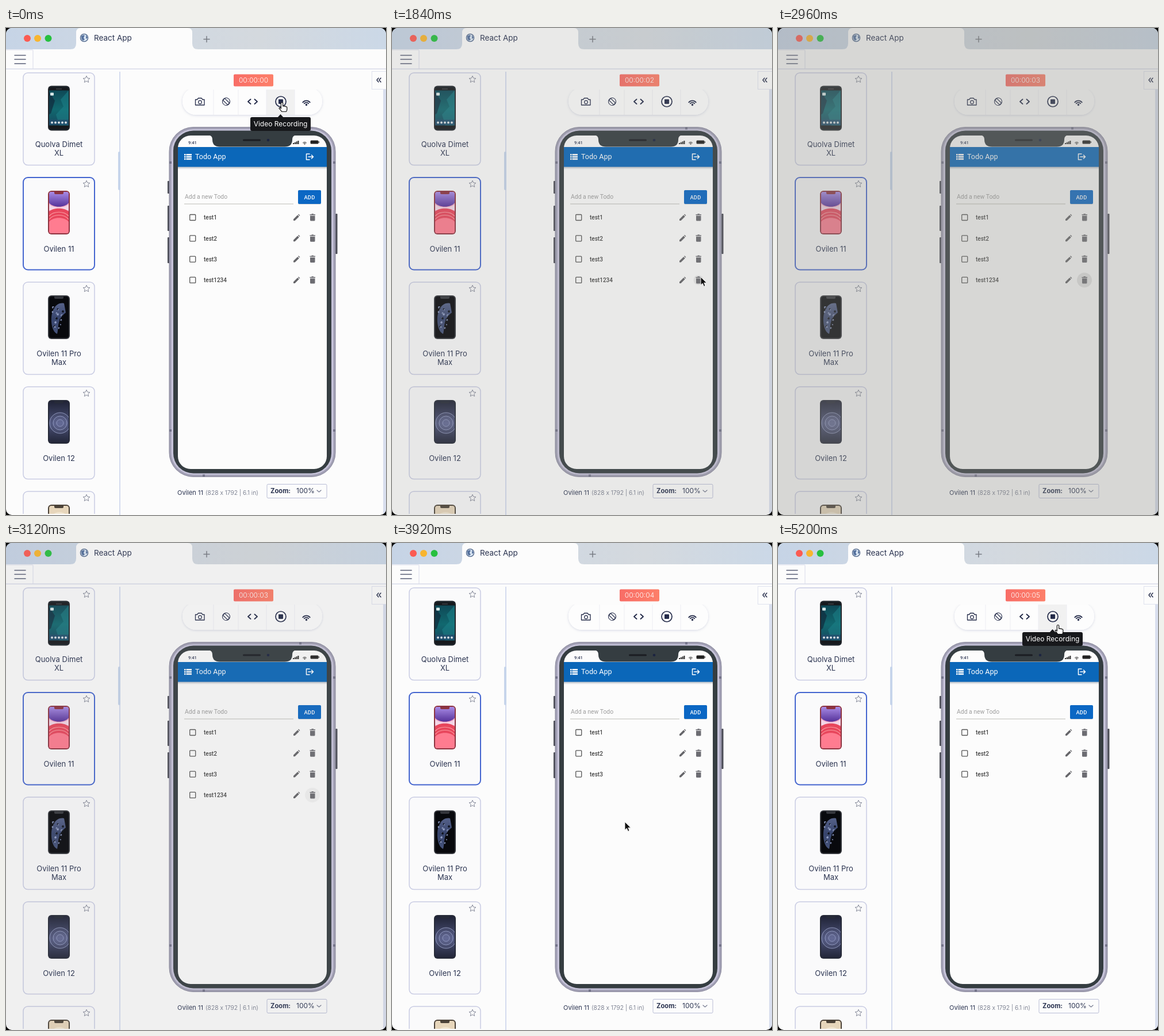
Animation, 661 px wide and 847 px high, one loop 5.24 s. Source, as an HTML page:

```html
<!DOCTYPE html>
<html lang="en">
<head>
<meta charset="utf-8">
<title>Device preview</title>
<style>
  html, body { margin: 0; width: 100%; height: 100%; overflow: hidden; background: #000; }
  svg { display: block; width: 661px; height: 847px; }
  text { font-family: Inter, "Open Sans", sans-serif; fill: #2a3350; white-space: pre; }
  .app text { font-family: Roboto, "Liberation Sans", sans-serif; }
  .mid { text-anchor: middle; }
  .line { fill: none; stroke: #252c4a; stroke-width: 1.5; stroke-linecap: round; stroke-linejoin: round; }
</style>
</head>
<body>
<svg id="stage" viewBox="0 0 661 847" xmlns="http://www.w3.org/2000/svg"></svg>
<script>
const LOOP = 5240;
const ROWS = ["test1", "test2", "test3", "test1234"];
const CARDS = [["Quolva Dimet", "XL"], ["Ovilen 11"], ["Ovilen 11 Pro", "Max"], ["Ovilen 12"], []];

const rect = (x, y, w, h, fill, r = 0, more = "") =>
  `<rect x="${x}" y="${y}" width="${w}" height="${h}" rx="${r}" fill="${fill}" ${more}/>`;
const circle = (x, y, r, fill, more = "") => `<circle cx="${x}" cy="${y}" r="${r}" fill="${fill}" ${more}/>`;
const path = (d, fill, more = "") => `<path d="${d}" fill="${fill}" ${more}/>`;
const line = (d, more = "") => `<path class="line" d="${d}" ${more}/>`;
const text = (x, y, size, str, more = "") => `<text x="${x}" y="${y}" font-size="${size}" ${more}>${str}</text>`;
const at = (x, y, body, more = "") => `<g transform="translate(${x} ${y})" ${more}>${body}</g>`;
const gradient = (id, colors, vertical) =>
  `<linearGradient id="${id}" x2="${vertical ? 0 : 1}" y2="${vertical ? 1 : 0}">` +
  colors.map((c, i) => `<stop offset="${i / (colors.length - 1)}" stop-color="${c}"/>`).join("") + `</linearGradient>`;

function star(x, y) {
  const points = Array.from({ length: 10 }, (_, i) => {
    const r = i % 2 ? 2.9 : 6.2, a = i * Math.PI / 5;
    return `${x + r * Math.sin(a)},${y - r * Math.cos(a)}`;
  });
  return `<polygon points="${points.join(" ")}" fill="none" stroke="#858999" stroke-linejoin="round"/>`;
}

function wifi(x, y, s, color) {
  const arc = r => `M${-r * .77} ${-r * .64}A${r} ${r} 0 0 1 ${r * .77} ${-r * .64}`;
  return at(x, y, `<g transform="scale(${s})">` + circle(0, -1, 2, color) +
    path(arc(5.4) + arc(9), "none", `stroke="${color}" stroke-width="2" stroke-linecap="round"`) + `</g>`);
}

// Thumbnail wallpapers, drawn in a 34 x 74 box
const wallpapers = [
  rect(0, 0, 34, 78, "url(#sea)") + path("M34 6L20 22 25 34 12 48 18 68H34Z", "#1d8289", 'opacity=".55"') +
    path("M0 8L10 24 3 46 0 48Z", "#102a3c", 'opacity=".7"') + rect(2, 10, 6, 5, "#d9e8e8", 1) +
    rect(0, 57, 34, 9, "#244c6c", 0, 'opacity=".8"') +
    [5, 11, 17, 23, 29].map(x => circle(x, 62, 1.9, x % 3 ? "#d8e0e4" : "#5aa0d8")).join("") +
    rect(0, 0, 34, 6, "#17191d") + rect(0, 67, 34, 11, "#17191d"),
  rect(0, 0, 34, 78, "#f0a6c4") + path("M0 0H34V19C28 28 6 28 0 19Z", "url(#violet)") +
    path("M0 21C6 29 28 29 34 21V32H0Z", "#f3d6e6") + path("M0 34C8 27 26 27 34 34V78H0Z", "#e8465c") +
    path("M0 42C8 33 26 33 34 42M0 48C8 38 26 38 34 48", "none", 'stroke="#fa9aa0" stroke-width="1.2"') +
    path("M0 52C7 43 27 43 34 52V78H0Z", "#ff7c90"),
  rect(0, 0, 34, 78, "#08090d") + path("M26 12C12 9 3 24 4 44 5 56 9 63 14 65 17 54 13 40 29 28Z", "url(#nebula)") +
    Array.from({ length: 26 }, (_, i) =>
      circle(6 + i * 7 % 19, 18 + i * 11 % 40, .9 + i % 3 * .5, i % 2 ? "#8f9cc4" : "#10141f")).join(""),
  rect(0, 0, 34, 78, "url(#night)") +
    [6, 12, 18].map(r => circle(19, 38, r, "#8790bd", `fill-opacity=".16" stroke="#a3abd0" stroke-width=".8"`)).join(""),
  rect(0, 0, 34, 78, "#e7d6bb") + circle(18, 28, 17, "#f2e6d0"),
];

function card(lines, i) {
  const y = 78 + i * 182, phoneTop = y + (i ? 23 : 22.5), chosen = i === 1;
  const frame = ["#23262b", "#8c3340", "#34363c", "#262a38", "#4b4238"][i];
  const notch = i ? path("M9 -1H25V2Q25 4 23 4H11Q9 4 9 2Z", frame) : rect(12, 3, 10, 1, "#50545a");
  return rect(30, y, 124, 160.5, "#fafafb", 8, `stroke="${chosen ? "#4465cf" : "#c9cce3"}" stroke-width="${chosen ? 2 : 1.5}"`) +
    star(140, y + 11.5) + rect(73, phoneTop, 38, i ? 76 : 78, frame, 6) +
    at(75, phoneTop + 2, `<g clip-path="url(#thumb${i ? "" : "Tall"})">${wallpapers[i]}${notch}</g>`) +
    lines.map((s, n) => text(92, y + 129 + n * 14.5, 13, s, 'class="mid"')).join("");
}

const chrome = () =>
  rect(0, 0, 661, 847, "#fcfcfc") + rect(0, 0, 661, 37, "url(#strip)") +
  path("M112 37Q122 37 122 27V8Q122 0 130 0H316Q324 0 324 8V27Q324 37 334 37Z", "#fcfcfc") +
  circle(37, 18, 6, "#fb5b52") + circle(55, 18, 6, "#f8b52f") + circle(73.5, 18, 6, "#27c03f") +
  circle(136, 17, 6.6, "#dce8f5", 'stroke="#4d6387" stroke-width="1.3"') +
  path("M131 14Q135 11 137 13L135 17 137 20 134 22Q130 19 131 14ZM139 12L142 17 139 19Z", "#56729e") +
  text(153, 22, 13.5, "React App") +
  line("M344 19.5H354M349 14.5V24.5", 'style="stroke:#777b83"') +
  rect(0, 70.5, 661, 1.5, "#d8dbea") + rect(-1, 38, 48, 33, "#fcfcfc", 1, 'stroke="#d8dbea"') +
  line("M15 47.5H34M15 54.5H34M15 62H34", 'style="stroke:#575d75"') +
  rect(197, 76, 2, 771, "#d5dcef") + rect(195, 215, 4, 67, "#c6d5eb", 2) +
  rect(656, 107, 5, 740, "#d9dfee") + rect(636.5, 75.5, 26, 31, "#fcfcfc", 0, 'stroke="#dfe2ee"') +
  line("M648 87L645 90.5 648 94M652 87L649 90.5 652 94");

const toolbar = () =>
  rect(396, 80.5, 69, 21, "url(#coral)", 2) + text(430.5, 95, 12, "00:00:00", 'id="timer" class="mid" font-weight="300" style="fill:#fff"') +
  `<g clip-path="url(#below)">` + rect(307, 104, 243, 47, "#fff", 23, 'filter="url(#soft)"') + rect(307, 104, 243, 47, "#fdfdfd", 23) + `</g>` +
  rect(453, 107, 49, 44, "#f1f1f1", 0, 'id="recordHover"') +
  [361, 404, 453, 502].map(x => rect(x - .5, 107, 1, 44, "#eeeef4")).join("") +
  line("M329.5 124.5H332.5L334.5 122H340L342 124.5H345V134H329.5Z", 'style="stroke-width:1.3"') +
  circle(337.5, 129, 2.8, "none", 'stroke="#252c4a" stroke-width="1.2"') +
  at(383, 128, line("M-2.2 -5.8H2.2V5.8H-2.2Z", 'transform="rotate(-45)" style="stroke-width:1.2"') +
    line("M-5.6 -3.3A6.5 6.5 0 0 1 5.6 3.3M5.6 3.3A6.5 6.5 0 0 1 -5.6 -3.3", 'style="stroke-width:1.1"')) +
  line("M425.5 124L421 128 425.5 132M432.5 124L437 128 432.5 132", 'style="stroke-width:1.9"') +
  circle(478, 128, 9, "none", 'stroke="#252c4a" stroke-width="1.7"') + rect(474, 124, 8, 8, "#252c4a", 1) +
  wifi(522.5, 134.5, .9, "#252c4a");

const todoRow = (name, i) => at(0, 329.5 + i * 36.3,
  rect(319.7, -5, 10, 10, "none", 1, 'stroke="#555" stroke-width="1.3"') +
  text(344, 3.7, 10, name, 'font-weight="500" style="fill:#444"') +
  circle(505.5, 0, 11, "#000", `id="edit${i}" opacity="0"`) +
  circle(533, 0, 13, "#000", `id="bin${i}" opacity="0"`) +
  path("M500 5.5V3L507.2 -4.2 509.8 -1.6 502.6 5.5ZM508 -5L509 -6 511.4 -3.5 510.5 -2.5Z", "#66666a") +
  path("M528.5 -5.5H531L532 -6.5H534.5L535.5 -5.5H538V-4H528.5ZM529 -3H537.5V4.5Q537.5 6 536 6H530.5Q529 6 529 4.5Z", "#6c6c72"),
  `id="row${i}"`);

const phone = () =>
  [[281, 266, 22], [281, 309, 44], [281, 364, 45], [573, 323, 70]].map(([x, y, h]) => rect(x, y, 3.5, h, "#4b4c56", 1)).join("") +
  rect(284, 172.5, 289, 608, "#a19fb4", 42, 'stroke="#8a899c"') +
  rect(287.5, 176, 282, 601, "#c6c3d9", 38) + rect(291, 178.5, 275, 596, "#353d41", 35) +
  [[284, 232], [569, 232], [284, 698], [569, 698]].map(([x, y]) => rect(x, y, 4, 4, "#74748a")).join("") +
  rect(510, 172.5, 4, 4, "#74748a") + rect(342, 776.5, 4, 4, "#74748a") +
  rect(299, 187, 259, 580, "#fcfcfc", 22) +
  path("M352 186Q359 187 359 194Q359 206.5 372 206.5H485Q498 206.5 498 194Q498 187 505 186Z", "#353d41") +
  rect(412, 193.5, 31, 3, "#1b1d22", 1.5) + circle(456, 195, 2.3, "#1c2440") +
  `<g class="app">` + text(317, 202, 7.5, "9:41", 'font-weight="500"') +
  [0, 1, 2, 3].map(i => rect(499 + i * 2.8, 200 - i * 1.3, 2, 2 + i * 1.3, "#222")).join("") +
  wifi(519.5, 202.3, .45, "#222") + rect(529.5, 195.5, 14, 6, "#222", 1.5) + rect(544, 197.3, 1, 2.4, "#222") +
  rect(299, 241, 259, 5, "url(#shade)") + rect(299, 207, 259, 34.5, "#0b67b9") +
  [219, 222.8, 226.6].map(y => rect(310, y, 2.5, 2.6, "#fff") + rect(313.5, y, 9.5, 2.6, "#fff")).join("") +
  text(329, 228.3, 12.5, "Todo App", 'style="fill:#fff"') +
  line("M528 219H522.5V229H528M526 224H534M531.5 221L534.5 224 531.5 227", 'style="stroke:#fff"') +
  text(311, 297, 10.4, "Add a new Todo", 'style="fill:#9d9d9d"') + rect(310, 305.5, 190, 1, "#bdbdb8") +
  rect(508, 282.5, 40, 24.5, "#555", 2, 'opacity=".2"') + rect(508, 282, 40, 24, "#0b67c4", 2) +
  text(528, 297.6, 9.3, "ADD", 'class="mid" font-weight="500" letter-spacing=".3" style="fill:#fff"') +
  ROWS.map(todoRow).join("") + `</g>` +
  text(298, 812, 11, "Ovilen 11") +
  text(347, 812, 10.3, "(828 x 1792 | 6.1 in)", 'font-weight="300" style="fill:#5f6579"') +
  rect(454, 793.5, 104, 24, "#fcfcfc", 2, 'stroke="#b9bdd6"') +
  text(460, 809.3, 11.2, "Zoom:", 'font-weight="700"') + text(505, 809.3, 12, "100%") +
  line("M541 804L544.5 807 548 804", 'style="stroke:#777c91;stroke-width:1.2"');

const stage = document.getElementById("stage");
stage.innerHTML = `<defs>
  ${gradient("strip", ["#c6d4e6", "#cfd8e3", "#d4d9de", "#cbd8e7"])}
  ${gradient("coral", ["#f86d66", "#fd7f69"])}
  ${gradient("shade", ["#b4bac2", "#fcfcfc"], true)}
  ${gradient("sea", ["#0e4352", "#11686f", "#183d58"], true)}
  ${gradient("violet", ["#a98be6", "#553299"], true)}
  ${gradient("nebula", ["#56628a", "#37446c", "#46547c"], true)}
  ${gradient("night", ["#202336", "#4a5076", "#1c1f2e"], true)}
  <clipPath id="window">${rect(0, 0, 661, 847, "#fff", 10)}</clipPath>
  <clipPath id="side">${rect(0, 76, 198, 769, "#fff")}</clipPath>
  <clipPath id="below">${rect(290, 107, 280, 60, "#fff")}</clipPath>
  <clipPath id="thumb">${rect(0, 0, 34, 72, "#fff", 4)}</clipPath>
  <clipPath id="thumbTall">${rect(0, 0, 34, 74, "#fff", 4)}</clipPath>
  <filter id="soft" x="-20%" y="-50%" width="140%" height="200%"><feDropShadow dx="0" dy="1" stdDeviation="2" flood-color="#8a93b5" flood-opacity=".35"/></filter>
  </defs><g clip-path="url(#window)">${chrome()}<g clip-path="url(#side)">${CARDS.map(card).join("")}</g>
  ${toolbar()}${phone()}
  <g id="tip">${path("M472 156L477.5 150 483 156Z", "#17181b")}${rect(425, 155, 105, 24, "#17181b", 3)}
  ${text(477.5, 171, 12, "Video Recording", 'class="mid" style="fill:#fff"')}</g>
  ${rect(0, 0, 661, 847, "#8c8c86", 0, 'id="dim"')}</g>
  <g id="cursor">
    ${path("M0 0V14.2L3.3 11.2 5.6 16.4 8 15.4 5.8 10.2H10.4Z", "#111", 'id="arrow" stroke="#fff" stroke-width=".9"')}
    ${path("M-1.6 1Q-1.6 -.5 0 -.5T1.6 1V6Q3 5 4.2 6.3 5.6 5.4 6.7 7 8.6 6.4 8.8 8.3V11.5Q8.6 14 7.4 15.5H-.3Q-1.8 13.2 -4.4 10.4C-5.6 8.8 -4 7.8 -2.7 9L-1.6 10Z", "#fff", 'id="hand" stroke="#111" stroke-width="1.2" stroke-linejoin="round"')}
  </g>`;

const el = id => document.getElementById(id);
const clamp = v => Math.min(1, Math.max(0, v));
const ramp = (t, from, to) => clamp((t - from) / (to - from));
const ease = v => v * v * (3 - 2 * v);
const show = (id, on) => el(id).setAttribute("visibility", on ? "visible" : "hidden");
const fade = (id, v) => el(id).setAttribute("opacity", v);

// Cursor stops: time, x, y
const STOPS = [
  [0, 480, 130], [440, 480, 130], [720, 488, 205], [1000, 510, 362], [1120, 524, 391], [1420, 537, 433],
  [2380, 537, 433], [2760, -20, 500], [3440, -20, 500], [3920, 405, 485], [4240, 420, 440],
  [4840, 484, 148], [5080, 487, 143], [LOOP, 487, 143],
];

function cursorAt(t) {
  const i = STOPS.findIndex((s, n) => n && t <= s[0]);
  const [t0, x0, y0] = STOPS[i - 1], [t1, x1, y1] = STOPS[i];
  const k = ease((t - t0) / (t1 - t0));
  return [x0 + (x1 - x0) * k, y0 + (y1 - y0) * k];
}

function draw(t) {
  const [x, y] = cursorAt(t);
  const onRecord = y < 152 && x > 453 && x < 502;
  el("cursor").setAttribute("transform", `translate(${x} ${y})`);
  show("hand", onRecord);
  show("arrow", !onRecord);
  show("recordHover", onRecord);
  show("tip", onRecord);
  el("timer").textContent = "00:00:0" + Math.floor(t / 1000 + .4);

  fade("edit1", .08 * ramp(t, 960, 1040) * (1 - ramp(t, 1080, 1200)));
  const press = ramp(t, 1740, 2120);
  fade("bin3", .04 * ramp(t, 1320, 1440) + .12 * press * (1 - ramp(t, 2840, 3080)));
  el("bin3").setAttribute("r", t < 1740 ? 11 : 7 + 6 * press);
  fade("dim", .46 * ramp(t, 1720, 2040) * (1 - ease(ramp(t, 2800, 3260))));
  show("row3", t < 3320);
}

function tick(now) {
  draw(now % LOOP);
  requestAnimationFrame(tick);
}
draw(0);
requestAnimationFrame(tick);
</script>
</body>
</html>
```
